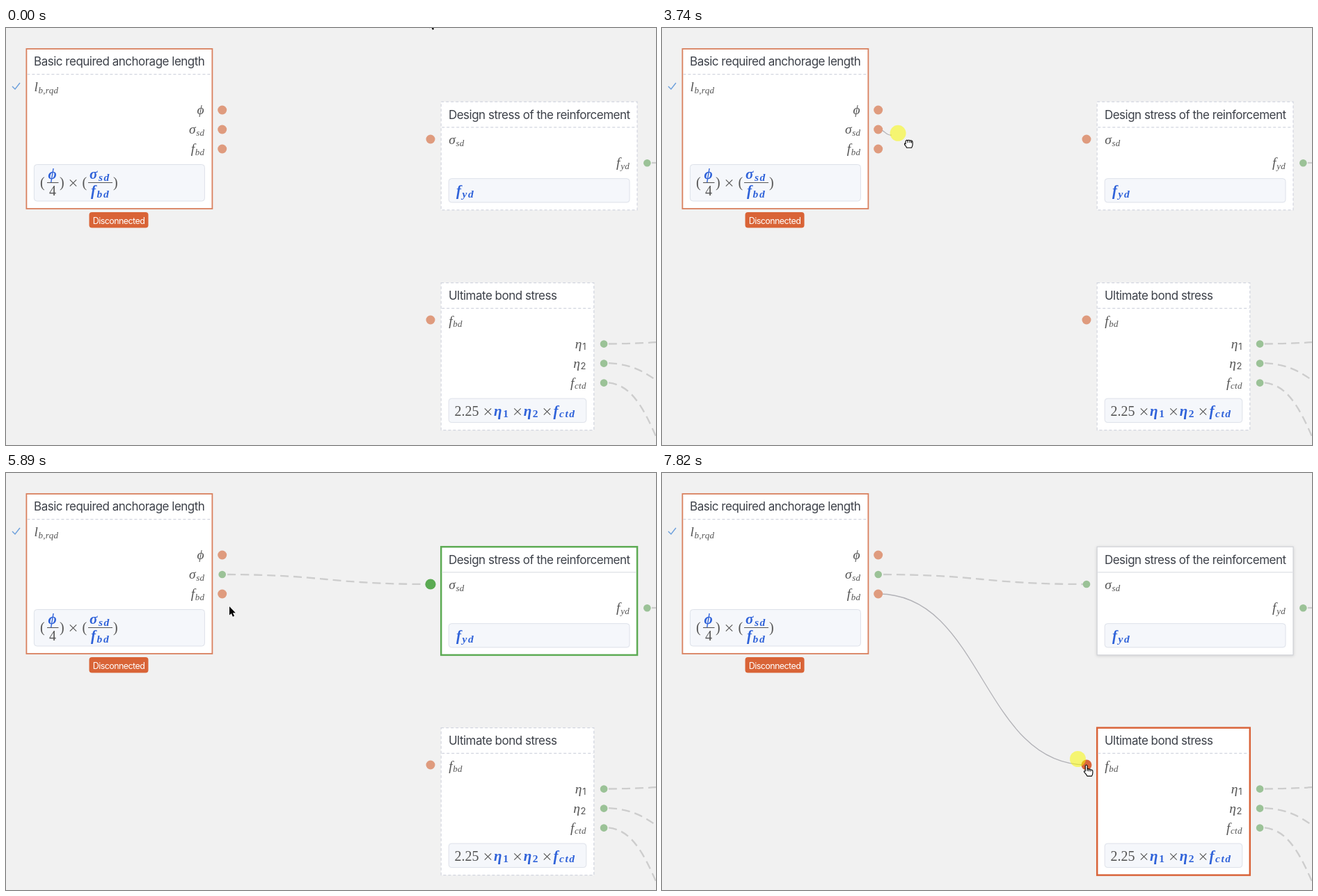
An HTML page for the animation above (8000 ms loop, 934 by 600 pixels).

```html
<!DOCTYPE html>
<html lang="en">
<head>
<meta charset="utf-8">
<style>
  html, body { margin: 0; width: 100%; height: 100%; overflow: hidden; background: #f1f1f1; }
  svg { display: block; width: 934px; height: 600px; }
  .title { font: 17px Inter, sans-serif; letter-spacing: -.5px; fill: #3d4149; }
  .badge { font: 12.5px Inter, sans-serif; letter-spacing: -.58px; fill: #fff; text-anchor: middle; }
  .math { font: italic 19.5px "Liberation Serif", serif; letter-spacing: .7px; fill: #555; }
  .math .sub { font-size: 13px; letter-spacing: .3px; }
  .bold { font: italic bold 21px "Liberation Serif", serif; letter-spacing: 1.6px; fill: #2f62d9; }
  .bold .sub { font-size: 15.5px; letter-spacing: 1.6px; }
  .roman { font: 20px "Liberation Serif", serif; letter-spacing: 0; fill: #555; }
  .math .sans { font: 13px Inter, sans-serif; }
  .end { text-anchor: end; }
  .mid { text-anchor: middle; }
  .stroke { fill: none; stroke: #555; stroke-width: 1.1; }
  .card { fill: #fff; }
  .dashed { stroke: #d2d5df; stroke-width: 1.2; stroke-dasharray: 4 3; }
  .linked { stroke: #cfd1d6; stroke-width: 1.2; filter: drop-shadow(0 1px 2px #0002); }
  .rule { stroke: #d5d8df; }
  .warn { stroke: #d9805e; stroke-width: 1.8; }
  .good { stroke: #5dab54; stroke-width: 2.5; }
  .bad { stroke: #d9643a; stroke-width: 2.5; }
  .formula { fill: #f5f7fb; stroke: #dde1e9; }
  .link { fill: none; stroke: #cdcdcd; stroke-width: 2.3; stroke-dasharray: 12 7; stroke-dashoffset: 12; }
  .wire { fill: none; stroke: #b2b2b7; stroke-width: 1.3; }
  #cursor path { stroke: #000; stroke-width: 1.1; fill: #fff; stroke-linejoin: round; }
  #cursor #arrow { fill: #000; stroke: #fff; stroke-width: 1; paint-order: stroke; }
</style>
</head>
<body>
<svg id="stage" viewBox="0 0 934 600"></svg>
<script>
const $ = id => document.getElementById(id);
const stage = $('stage');

const text = (x, y, s, cls) => `<text x="${x}" y="${y}" class="${cls}">${s}</text>`;
// "f_bd" becomes f with the subscript bd; digits are upright.
const sym = (x, y, name, cls = 'math') => {
  const [base, sub = ''] = name.split('_');
  const digit = /\d/.test(sub) ? (cls === 'bold' ? 'upright' : 'sans') : '';
  const style = digit === 'upright' ? ' font-style="normal"' : '';
  return text(x, y, base + (sub && `<tspan class="sub ${digit}"${style} dy="2.6">${sub}</tspan>`), cls);
};
const times = (x, y) =>
  `<path class="stroke" d="M${x - 4.7} ${y - 4.7}l9.4 9.4m0 -9.4l-9.4 9.4"/>`;
const bar = (x, y, w) => `<path class="stroke" d="M${x} ${y}h${w}"/>`;
const curve = (x1, y1, x2, y2) => {
  const m = (x1 + x2) / 2;
  return `M${x1} ${y1}C${m} ${y1} ${m} ${y2} ${x2} ${y2}`;
};
const dot = (id, x, y) => `<circle id="${id}" cx="${x}" cy="${y}"/>`;

// A card stacks its title, result, inputs and formula box on one rhythm.
function card({ id, x, y, w, title, result, inputs, boxH, cls = 'dashed', ruleCls = 'dashed' }) {
  const rowY = i => y + 88 + 28 * i;
  const boxY = rowY(inputs.length - 1) + 22.5;
  return `<rect id="${id}" x="${x}" y="${y}" width="${w}" height="${boxY + boxH + 11 - y}" class="card ${cls}"/>
    <path id="${id}Rule" d="M${x + 1} ${y + 36.7}h${w - 2}" class="${ruleCls}"/>
    <rect class="formula" x="${x + 11}" y="${boxY}" width="${w - 22}" height="${boxH}" rx="4"/>` +
    text(x + 10.7, y + 24.4, title, 'title') +
    sym(x + 11, y + 61, result) +
    inputs.map((name, i) => sym(x + w - 11, rowY(i) + 6, name, 'math end') +
      dot(id + i, x + w + 14.3, rowY(i))).join('');
}

const product = ['η_1', 'η_2', 'f_ctd'].map((name, i) =>
  times(692.5 + 42.5 * i, 552) + sym(701 + 42.7 * i, 557.5, name, 'bold')).join('');

stage.innerHTML =
  `<path class="link" d="M921 194H940"/>
   <path class="link" d="M859 454.5Q897 454.5 937 452"/>
   <path class="link" d="M859 482C890 482 912 490 937 509"/>
   <path class="link" d="M859 510C893 510 912 535 937 595"/>
   <path id="joined" class="link" d="${curve(311, 146, 610, 160)}"/>
   <path id="wire" class="wire"/>` +

  card({ id: 'anchorage', x: 29.4, y: 30, w: 267, title: 'Basic required anchorage length',
    result: 'l_b,rqd', inputs: ['ϕ', 'σ_sd', 'f_bd'], boxH: 52.5, cls: 'warn' }) +
  '<path d="M9 84l4 4 7-9" fill="none" stroke="#6b9fdc" stroke-width="1.4"/>' +
  text(49, 229, '(', 'roman') + text(67.5, 217, 'ϕ', 'bold mid') + bar(59, 222.5, 16.5) +
  text(67, 241, '4', 'roman mid') + text(77, 229, ')', 'roman') + times(96.5, 223) +
  text(109.5, 229, '(', 'roman') + sym(120, 217, 'σ_sd', 'bold') + bar(118, 222.5, 35) +
  sym(122, 241, 'f_bd', 'bold') + text(154, 229, ')', 'roman') +
  '<rect x="119.5" y="265" width="85" height="22.5" rx="4" fill="#d96437"/>' +
  text(162, 281.5, 'Disconnected', 'badge') +

  card({ id: 'design', x: 625.2, y: 106.2, w: 281.8, title: 'Design stress of the reinforcement',
    result: 'σ_sd', inputs: ['f_yd'], boxH: 34.2 }) +
  sym(647, 241, 'f_yd', 'bold') +

  card({ id: 'bond', x: 625.2, y: 366.6, w: 219.6, title: 'Ultimate bond stress',
    result: 'f_bd', inputs: ['η_1', 'η_2', 'f_ctd'], boxH: 34.5 }) +
  text(644.5, 558, '2.25', 'roman') + product +

  dot('designIn', 610, 160) + dot('bondIn', 610, 420) +
  `<circle id="press" r="11.5" fill="#fafa00" opacity=".53"/>
   <g id="cursor">
     <path id="arrow" transform="scale(.88)" d="M0 0V14.2L3.2 11.3 5.6 16.8 8 15.7 5.6 10.4H10Z"/>
     <path id="hand" d="M-1.2 1.8Q.2-.8 1.6 1.8V6.8Q3 5.4 4 7Q5.5 5.9 6.5 7.5Q9.4 7 9.4 10V12Q9.4 14 8 16.6H1.5Q0 13.5-2.8 10.8Q-3.7 8.6-1.2 9.6ZM1.6 6.8v2.8M4 7v2.8M6.5 7.5v2.5"/>
     <path id="fist" d="M-1 6.4V3.8Q0 1.2 2 2.7Q3.5 1.2 5 2.7Q9 2 9 5.4V8.4Q9 10.4 7.5 13H.5Q0 10.8-2.4 8.8Q-3.2 6.3-1 6.4V8.2M2 2.7v3M5 2.7v3M7.3 3.7v2.5"/>
   </g>`;

// Moments of the story, in ms
const GRAB1 = 3540, OVER1 = 4700, DROP1 = 5480, SETTLE = 6000, GRAB2 = 6380, OVER2 = 7130;

// Pointer moves: start and end time, goal, sideways bulge of the path in y
const moves = [
  [100, 890, 256, 139, 95],
  [990, 1710, 303, 138, -4],
  [1810, 2130, 322, 140, -16],
  [2360, 2680, 316.5, 141.5, 0],
  [2700, 3360, 312, 150, 0],
  [GRAB1, 4410, 600.5, 163.5, 18],
  [4410, OVER1, 606, 159, 0],
  [DROP1, 5890, 321, 192, 10],
  [5900, 6220, 316, 174.5, 0],
  [GRAB2, OVER2, 608, 418.5, -27],
  [OVER2, 7820, 609.5, 419.5, 0]
];

function pointer(t) {
  let x = 608, y = -12;
  for (const [from, to, gx, gy, bulge] of moves) {
    const k = Math.min(1, Math.max(0, (t - from) / (to - from)));
    const e = k * k * (3 - 2 * k);
    x += (gx - x) * e;
    y += (gy - y) * e + bulge * Math.sin(Math.PI * e);
    if (k < 1) break;
  }
  return [x, y];
}

const show = (id, on) => $(id).setAttribute('visibility', on ? 'visible' : 'hidden');
const setClass = (id, cls) => $(id).setAttribute('class', cls);
const looks = {
  idle: [6.5, '#df9b7e'], hover: [7.5, '#d9663c'],
  done: [5.3, '#9bc297'], drop: [7.6, '#5aaa52']
};
function paint(id, look) {
  const [r, fill] = looks[look];
  $(id).setAttribute('r', r);
  $(id).setAttribute('fill', fill);
}
['design0', 'bond0', 'bond1', 'bond2'].forEach(id => paint(id, 'done'));

function draw(t) {
  const within = (a, b) => t >= a && t < b;
  const [x, y] = pointer(t);
  const joined = t >= DROP1, second = t >= GRAB2, over2 = t >= OVER2;
  const pressed = second || within(GRAB1, DROP1);

  const state = t < OVER1 ? 'dashed' : !joined ? 'bad' : t < SETTLE ? 'good' : 'linked';
  setClass('design', 'card ' + state);
  setClass('designRule', joined ? 'rule' : 'dashed');
  setClass('bond', 'card ' + (over2 ? 'bad' : 'dashed'));

  paint('anchorage0', within(1900, 2030) ? 'hover' : 'idle');
  paint('anchorage1', joined ? 'done' : within(2060, GRAB1) ? 'hover' : 'idle');
  paint('anchorage2', within(6080, GRAB2) ? 'hover' : 'idle');
  paint('designIn', { dashed: 'idle', bad: 'hover', good: 'drop', linked: 'done' }[state]);
  paint('bondIn', over2 ? 'hover' : 'idle');

  show('joined', joined);
  show('wire', pressed);
  show('press', pressed);
  if (pressed) {
    // The loose end trails the pointer and snaps to a nearby socket.
    const [startY, goalY, grab] = second ? [174, 420, GRAB2] : [146, 160, GRAB1];
    let [ex, ey] = pointer(Math.max(t - 70, grab));
    if (Math.hypot(ex - 610, ey - goalY) < 16) [ex, ey] = [610, goalY];
    $('wire').setAttribute('d', curve(311, startY, ex, ey));
    $('press').setAttribute('cx', x - 12);
    $('press').setAttribute('cy', y - 8);
  }

  const fist = within(GRAB1, OVER1) || within(GRAB2, OVER2);
  const arrow = t < 1900 || within(DROP1 + 60, 6080);
  show('arrow', arrow);
  show('fist', fist);
  show('hand', !arrow && !fist);
  $('cursor').setAttribute('transform', `translate(${x} ${y})`);
}

const start = performance.now();
function loop(now) {
  draw(Math.max(0, now - start) % 8000);
  requestAnimationFrame(loop);
}
draw(0);
requestAnimationFrame(loop);
</script>
</body>
</html>
```
